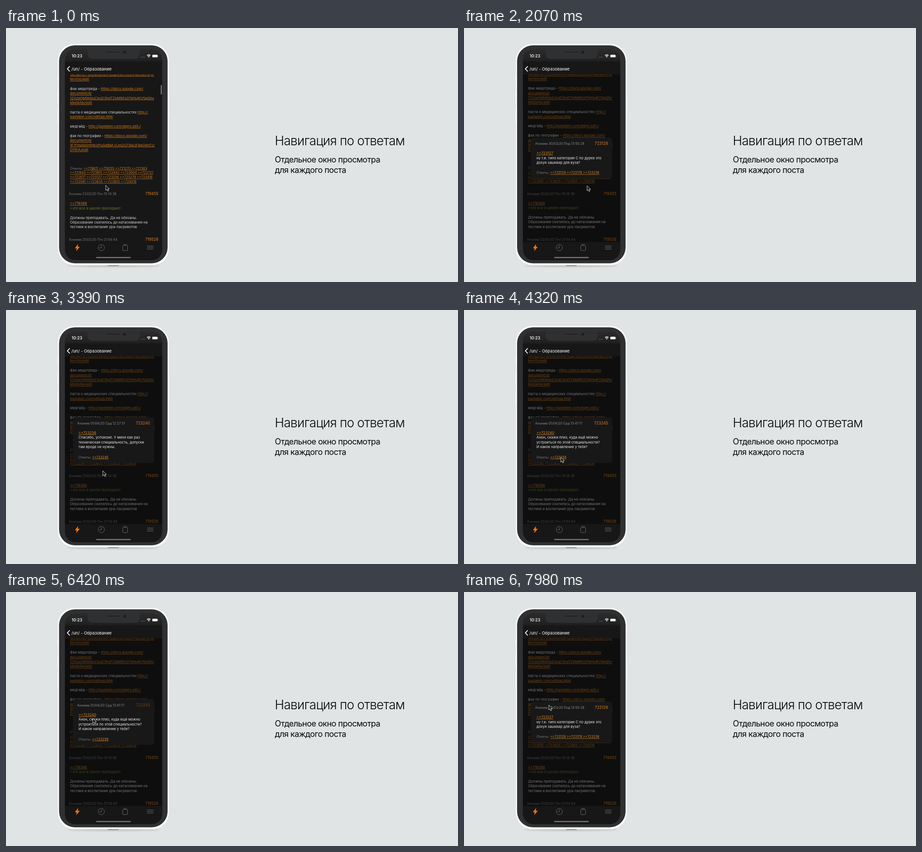
An HTML page that plays this animation: 998x561 px, repeating every 8 s.

```html
<!DOCTYPE html>
<html lang="ru">
<head>
<meta charset="utf-8">
<title>Навигация по ответам</title>
<style>
html, body { margin: 0; width: 100%; height: 100%; overflow: hidden; background: #e0e4e5; }
svg { display: block; width: 998px; height: 561px; font-family: Inter, Roboto, sans-serif; }
text { white-space: pre; }
.title { font-size: 28px; font-weight: 300; letter-spacing: -.79px; fill: #060606; }
.sub { font-size: 18.2px; font-weight: 400; letter-spacing: -.62px; fill: #060606; }
.body { font-size: 7.87px; fill: #cfcfcf; }
.pop .body { fill: #e6e6e6; }
.pop .bold { font-weight: 700; }
.link { fill: #cb781d; text-decoration: underline; text-decoration-thickness: .6px; }
.pop .link { fill: #dd8828; }
.replies { font-size: 7.25px; }
.label { fill: #777; font-style: italic; }
.meta { font-size: 7.2px; fill: #7a7a7a; }
.pop .meta { fill: #8c8c8c; }
.num { font-size: 8.5px; fill: #d87f24; text-anchor: end; }
.quote { font-size: 7.87px; fill: #667a2c; }
.icon { fill: none; stroke: #6b6b6b; stroke-width: 1; }
</style>
</head>
<body>
<svg viewBox="0 0 998 561">
  <defs>
    <linearGradient id="glass" x1="0" y1="0" x2="0" y2="1">
      <stop offset="0" stop-color="#2b2b2c"/>
      <stop offset=".05" stop-color="#222"/>
      <stop offset=".062" stop-color="#171717"/>
    </linearGradient>
    <filter id="soft" x="-20%" y="-300%" width="140%" height="700%"><feGaussianBlur stdDeviation="2"/></filter>
    <clipPath id="view"><rect x="130" y="102.5" width="215" height="370"/></clipPath>
  </defs>
  <rect width="998" height="561" fill="#e0e4e5"/>

  <ellipse cx="237" cy="524" rx="102" ry="3" fill="#8d9293" opacity=".55" filter="url(#soft)"/>
  <g fill="#eceeee" stroke="#c9cdce" stroke-width=".6">
    <rect x="111.8" y="102" width="5" height="18" rx="1.5"/>
    <rect x="111.8" y="135" width="5" height="33" rx="1.5"/>
    <rect x="111.8" y="178" width="5" height="33" rx="1.5"/>
    <rect x="357.5" y="147" width="5" height="52" rx="1.5"/>
  </g>
  <rect x="114.4" y="35" width="245" height="489.3" rx="37" fill="#fcfcfc"/>
  <rect x="117.7" y="38.8" width="238.6" height="480.4" rx="34" fill="#2f3031" stroke="#222323" stroke-width=".8"/>
  <rect x="225" y="524" width="24" height="1.6" rx=".8" fill="#777b7c"/>
  <rect x="130" y="47" width="215" height="466" rx="23" fill="url(#glass)"/>
  <path d="M176 46.5Q180 48 180 52V56Q180 68 192 68H283Q295 68 295 56V52Q295 48 299 46.5Z" fill="#2f3031"/>
  <rect x="222" y="52" width="30" height="2.6" rx="1.3" fill="#1a1a1b" stroke="#414243" stroke-width=".5"/>
  <circle cx="262" cy="53.5" r="2.6" fill="#202127" stroke="#17181a"/>

  <g clip-path="url(#view)">
    <rect x="130" y="102" width="215" height="371" fill="#171717"/>
    <g id="feed"></g>
    <rect id="bar" x="341.8" y="126" width="2" height="21" rx="1" fill="#8b8b8b"/>
    <rect id="dim" x="130" y="102" width="215" height="371" fill="#050505"/>
  </g>
  <g id="pops"></g>

  <text x="145" y="65" font-size="8.8" font-weight="600" fill="#f2f2f2">10:23</text>
  <path d="M298 64.5h9" stroke="#8a8a8a" stroke-width="1" stroke-dasharray="1.3 1.2"/>
  <g fill="none" stroke="#f2f2f2" stroke-width="1.3">
    <path d="M311.2 60.7Q315.2 57.2 319.2 60.7M312.7 62.5Q315.2 60.4 317.7 62.5"/>
  </g>
  <path d="M313.7 63.6Q315.2 62.6 316.7 63.6L315.2 65.4Z" fill="#f2f2f2"/>
  <rect x="323" y="59" width="11.6" height="5.8" rx="1.6" fill="#f2f2f2"/>
  <path d="M335.6 61v2" stroke="#999" stroke-width="1"/>
  <path d="M140.7 84.7L135.5 90.3L140.7 95.9" fill="none" stroke="#f2f2f2" stroke-width="1.8"/>
  <text x="144.6" y="93.5" font-size="9.3" font-weight="500" fill="#dedede">/un/ - Образование</text>

  <path d="M159.3 477L152 486.4H156.2L154.8 493L163 483.2H158.4Z" fill="#fb7507"/>
  <g class="icon">
    <circle cx="210.5" cy="485" r="6.9"/><path d="M210.7 480.5V485.5H206.5"/>
    <rect x="257.7" y="480.3" width="10.8" height="11.3" rx="1.8"/><path d="M259.2 478.2H267"/>
    <path d="M311.3 481.5H325.5M311.3 484.9H325.5M311.3 488.3H325.5"/>
  </g>
  <rect x="199" y="505.8" width="76.5" height="2.5" rx="1.25" fill="#777"/>

  <path id="cursor" d="M-.8 0V11L1.8 8.7 3.6 12.7 5.5 11.9 3.8 8H7.2Z" fill="#111" stroke="#e2e2e2" stroke-width=".9" stroke-linejoin="round"/>

  <text class="title" x="593.6" y="259.3">Навигация по ответам</text>
  <text class="sub" x="593.6" y="297.3">Отдельное окно просмотра</text>
  <text class="sub" x="593.6" y="319.8">для каждого поста</text>
</svg>
<script>
const LOOP = 8000, STEP = 10.4, MID = 287.3;
const $ = id => document.getElementById(id);
const clamp = v => Math.max(0, Math.min(1, v));
const ramp = (t, start, length) => clamp((t - start) / length);

// Square brackets mark a link; y is the middle of the line.
const line = (cls, x, y, str) => `<text class="${cls}" x="${x}" y="${(y + 2.8).toFixed(2)}">` +
  str.replace(/>/g, '&gt;').replace(/\[(.*?)\]/g, '<tspan class="link">$1</tspan>') + '</text>';
const label = '<tspan class="label">Ответы: </tspan>';
const replies = (x, y, str) => line('replies', x, y, '@' + str).replace('@', label);
const block = (x, y, rows) => rows.map((row, i) =>
  row ? line(row[0] === '>' ? 'quote' : 'body', x, y + i * STEP, row) : '').join('');
const head = (x, right, y, date, id) =>
  line('meta', x, y, 'Аноним ' + date) + line('num', right, y, String(id));

$('feed').innerHTML = block(141.3, 102.2, [
  '[1RCekHD7ShDRhWNvPxbanmkrOg3FFIRDtecnPpr]',
  '[NvV0o/edit]',
  '',
  'Фак медотреда - [https://docs.google.com/]',
  '[document/d/]',
  '[1ZXzeOMWiduCeuD3hgTZpM9Es07qHujKV5eQhv]',
  '[MqGkNs/edit]',
  '',
  'паста о медицинских специальностях [http://]',
  '[pastebin.com/x65gdJNW]',
  '',
  'медгайд - [http://pastebin.com/dqmLxdXJ]',
  '',
  'фак по географии - [https://docs.google.com/]',
  '[document/d/]',
  '[1F7IYqAb0nfHkVPuGdBM-0JnGG73lkUF8pOeVCU]',
  '[Df5hA/edit]'
]) +
  replies(141.3, 309.3, '[>>719611 >>719705 >>721270 >>721363]') +
  ['721943 >>721955 >>722442 >>722604 >>722721',
   '722817 >>723127 >>723256 >>723279 >>723416',
   '723591 >>723635 >>723855 >>724018'
  ].map((row, i) => line('replies', 141.3, 319 + i * 9.75, `[>>${row}]`)).join('') +
  head(139, 336.5, 366, '21/02/20 Птн 15:14:38', 719455) +
  block(141.3, 387, ['[>>719386]', '>это все в школе преподают', '',
    'Должны преподавать. Да не обязаны.',
    'Образование скатилось до натаскивания на',
    'тестики и воспитания ура-пасривотов']) +
  head(139, 336.5, 466.7, '21/02/20 Птн 21:54:44', 719526);

const posts = {
  723127: ['30/03/20 Пнд 13:46:02', '>>723128', [
    '[>>719386]',
    'Поясните по медкомиссии для вуза. На',
    'какие направления без справки даже',
    'документы не берут, а где смотрят',
    'только для галочки?',
    'Хочу подать на техническую',
    'специальность, но в карте стоит',
    'категория С, и я не понимаю, будет ли',
    'это проблемой при зачислении.',
    'В приёмной комиссии ничего толком',
    'не говорят, отправляют к врачу, а врач',
    'отправляет обратно в комиссию.',
    'Кто уже проходил через такое,',
    'расскажите, как всё было.']],
  723128: ['30/03/20 Пнд 13:50:28', '>>723129 >>723178 >>723236', [
    '[>>723127]',
    'ну т.е. типо категория С по дурке это',
    'дохуя зашквар для вуза?']],
  723236: ['01/04/20 Срд 11:18:54', '>>723240', [
    '[>>723128]',
    'Ну я учился с несколькими',
    'шизофрениками, они даже умудрялись',
    'отъезжать в психушки во время учебы,',
    'ну и на колесах сидели, офк. Если у',
    'тебя по специальности не положено',
    'допуски получить медицинские, то',
    'заболевания кукушки никак не',
    'помешают поступить.']],
  723240: ['01/04/20 Срд 12:27:31', '>>723245', [
    '[>>723236]',
    'Спасибо, успокоил. У меня как раз',
    'техническая специальность, допуски',
    'там вроде не нужны.']],
  723245: ['01/04/20 Срд 13:41:17', '>>723259', [
    '[>>723240]',
    'Анон, скажи плиз, куда ещё можно',
    'устроиться по этой специальности?',
    'И какое направление у тебя?']],
  723259: ['01/04/20 Срд 14:58:40', '>>723262', [
    '[>>723245]',
    'Приборостроение. А куда берут?']],
  723262: ['01/04/20 Срд 15:12:05', '', [
    '[>>723259]',
    '*ЛУМВЕК',
    '*ДАРВЕНА']]
};

function popup(id) {
  const [date, answers, rows] = posts[id];
  const last = (rows.length - 1) * STEP;
  const h = 47.3 + last + (answers ? 22.5 : 0), top = MID - h / 2;
  const text = block(160, top + 34.3, rows).replace(/class="body"([^>]*>)\*/g, 'class="body bold"$1');
  return `<g class="pop" id="p${id}"><rect x="147.7" y="${top}" width="179.3" height="${h}" rx="5" fill="#181818"/>` +
    head(157, 318, top + 13, date, id) + text +
    (answers ? replies(160, top + 56.8 + last, `[${answers}]`) : '') + '</g>';
}
$('pops').innerHTML = Object.keys(posts).map(popup).join('');

// Opening time of each post, forwards and then back.
const visits = [[720, 723127], [1710, 723128], [2580, 723236], [3270, 723240], [3960, 723245],
  [4560, 723259], [5160, 723262], [5970, 723259], [6340, 723245], [6840, 723240],
  [7260, 723236], [7860, 723128]];

// time, x, y of the pointer tip
const path = [[0, 221, 347.5], [390, 221, 347.5], [600, 204, 331], [820, 204, 331], [1170, 229.5, 374.5],
  [1380, 229.5, 374.5], [1440, 222.5, 374.5], [1770, 222.5, 374.5], [2070, 272.5, 348.5],
  [2340, 290, 318], [2600, 290, 318], [2700, 286, 323.5], [3060, 214.5, 355], [3400, 214.5, 355],
  [3800, 214.5, 325], [4620, 214.5, 325], [4900, 196, 314], [5240, 196, 314], [5500, 193, 288],
  [6300, 193, 288], [6420, 192.5, 279], [7020, 190, 263], [7300, 190, 263], [7600, 188, 249.5], [LOOP, 188, 249.5]];

function pointer(t) {
  const i = path.findIndex(k => k[0] > t);
  const [t0, x0, y0] = path[i - 1], [t1, x1, y1] = path[i];
  const p = (t - t0) / (t1 - t0);
  return [x0 + (x1 - x0) * p, y0 + (y1 - y0) * p];
}

function show(id, alpha, numAlpha) {
  const g = $('p' + id);
  g.style.display = alpha > 0 ? '' : 'none';
  g.style.opacity = alpha;
  g.querySelector('.num').style.opacity = numAlpha;
}

function draw(t) {
  $('feed').setAttribute('transform', `translate(0 ${0.5 * (1 - ramp(t, 0, 210)) ** 2})`);
  $('bar').style.opacity = 1 - ramp(t, 390, 300);
  $('dim').style.opacity = 0.47 * ramp(t, 720, 180);

  const n = visits.filter(v => v[0] <= t).length - 1;
  for (const id in posts) show(id, 0, 1);
  if (n >= 0) {
    const [start, id] = visits[n], fade = ramp(t, start, 80);
    if (n > 0) show(visits[n - 1][1], 1 - fade, 1);
    show(id, fade, 0.25 + 0.75 * ramp(t, start + 70, 50));
  }
  $('cursor').setAttribute('transform', `translate(${pointer(t)})`);
}

function tick() {
  draw(performance.now() % LOOP);
  requestAnimationFrame(tick);
}
tick();
</script>
</body>
</html>
```
